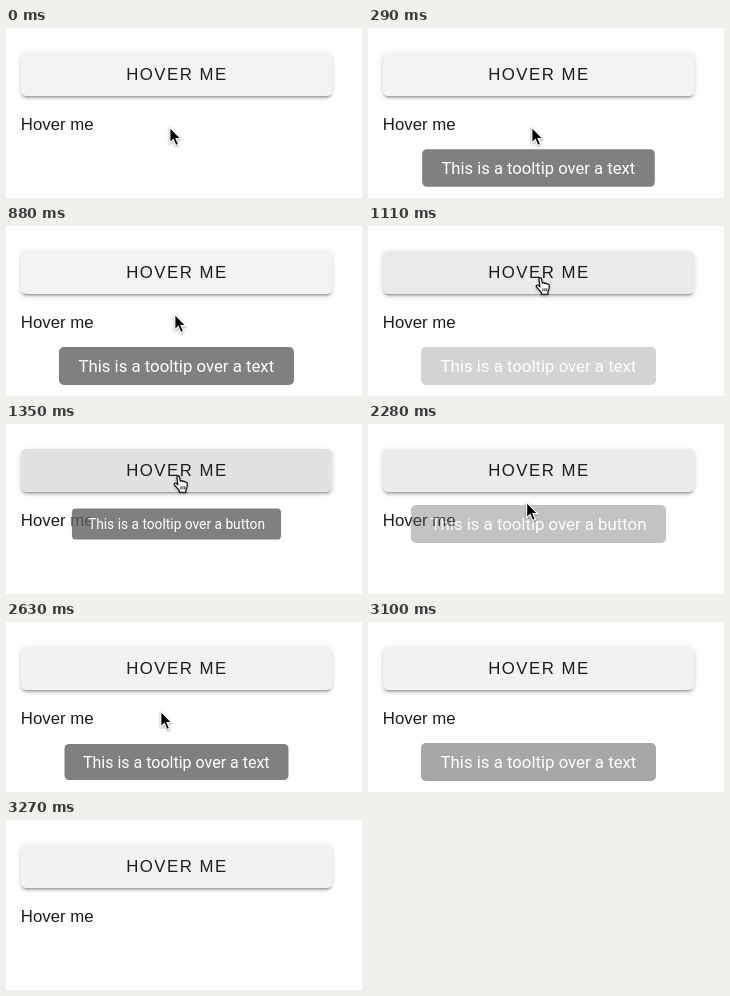
An HTML page that plays this animation: 356x170 px, repeating every 3.77 s.

```html
<!DOCTYPE html>
<html lang="en">
<head>
<meta charset="utf-8">
<title>Tooltips</title>
<style>
html, body { margin: 0; width: 100%; height: 100%; overflow: hidden; background: #fefefe; }
body { position: relative; font: 16.8px "Liberation Sans", Arial, sans-serif; color: #1c1c1c; }
body > * { position: absolute; white-space: nowrap; }
#button {
  left: 15px; top: 25px; width: 311px; height: 43.2px; line-height: 43.2px;
  border-radius: 4.8px; text-align: center; letter-spacing: 1.5px; text-indent: .8px;
  box-shadow: 0 3.6px 1.2px -2.4px #0003, 0 2.4px 2.4px #00000024, 0 1.2px 6px #0000001f;
}
#label { left: 14.8px; top: 85px; line-height: 24px; }
.tip {
  height: 38.4px; line-height: 38.4px; border-radius: 4.8px; text-align: center;
  background: rgba(97, 97, 97, .8); color: #fff; font-family: Roboto, sans-serif;
}
#textTip { left: 53.2px; top: 121px; width: 234.6px; }
#buttonTip { left: 43px; top: 80.5px; width: 255px; }
svg { left: 0; top: 0; filter: drop-shadow(0 1px 1px #0005); }
</style>
</head>
<body>
<div id="button">HOVER ME</div>
<div id="label">Hover me</div>
<div id="textTip" class="tip">This is a tooltip over a text</div>
<div id="buttonTip" class="tip">This is a tooltip over a button</div>
<svg width="356" height="170">
  <path id="arrow" d="M0 0V15.6L3.5 12.3L6 18.2L8.8 17L6.3 11.3H11Z" stroke="#fff" stroke-width="1.2"/>
  <g id="hand" fill="#fff" stroke="#000" stroke-width="1.1" stroke-linejoin="round">
    <path d="M3.6 1.6C3.6 .2 6 .2 6.3 1.6L7 6C7.4 5 9.2 5 9.4 6.3C10 5.5 11.6 5.8 11.8 7C12.4 6.4 14 6.8 14 8.2C14.1 11 13.8 12.5 12.6 14.5V17H6V15.3C4.5 13.5 3 11.5 1.2 9.6C.2 8.3 1.6 7.2 2.8 8L4.6 9.6Z"/>
    <path d="M7.6 11v3M9.6 11v3M11.5 11v3" stroke-width=".9"/>
  </g>
</svg>
<script>
const LOOP = 3770;
const $ = id => document.getElementById(id);

// Linear interpolation over [time, value] pairs
function track(keys, t) {
  const i = keys.findIndex(k => k[0] > t);
  if (i < 0) return keys[keys.length - 1][1];
  if (i === 0) return keys[0][1];
  const [t0, a] = keys[i - 1], [t1, b] = keys[i];
  return a + (b - a) * (t - t0) / (t1 - t0);
}

// Tooltip scale, one step every STEP ms after entry
const STEP = 55;
const GROW = [.45, .82, .953, .99, 1];
const APPEAR = [[0, .4], [STEP, 1]];

// Cursor poses: start time, shape, x, y
const POSES = [
  [0, "arrow", 163.8, 99.3], [880, "arrow", 168.8, 88.3], [940, "arrow", 170, 75],
  [990, "hand", 167.3, 60], [1050, "hand", 167.3, 51.3],
  [1990, "hand", 161.8, 60.3], [2050, "hand", 160, 63], [2110, "arrow", 161, 70],
  [2170, "arrow", 159.5, 75], [2280, "arrow", 158.6, 78.3], [2340, "arrow", 156, 84],
  [2400, "arrow", 154.8, 89.3], [2980, "none", 0, 0]
];

// Each visit: tooltip, start of entry, start and end of fade
const VISITS = [
  ["textTip", 120, 940, 1200],
  ["buttonTip", 1290, 2170, 2380],
  ["textTip", 2520, 3030, 3260]
];

function draw(now) {
  const t = now % LOOP;

  for (const id of ["textTip", "buttonTip"]) {
    const visit = VISITS.find(v => v[0] === id && t >= v[1] && t < v[3]);
    const style = $(id).style;
    style.opacity = 0;
    if (!visit) continue;
    const [, enter, leave, end] = visit;
    const step = Math.min(Math.floor((t - enter) / STEP), GROW.length - 1);
    style.opacity = track(APPEAR, t - enter) * track([[leave, 1], [end, 0]], t);
    style.transform = `scale(${GROW[step]})`;
  }

  const shade = track([[990, 243], [1230, 226], [2110, 226], [2420, 242]], t);
  $("button").style.background = `rgb(${shade}, ${shade}, ${shade})`;

  const [, shape, x, y] = POSES.filter(p => p[0] <= t).pop();
  for (const id of ["arrow", "hand"]) {
    $(id).style.display = id === shape ? "" : "none";
    $(id).setAttribute("transform", `translate(${x} ${y})`);
  }
}

const start = performance.now();
function frame() {
  draw(performance.now() - start);
  requestAnimationFrame(frame);
}
frame();
</script>
</body>
</html>
```
